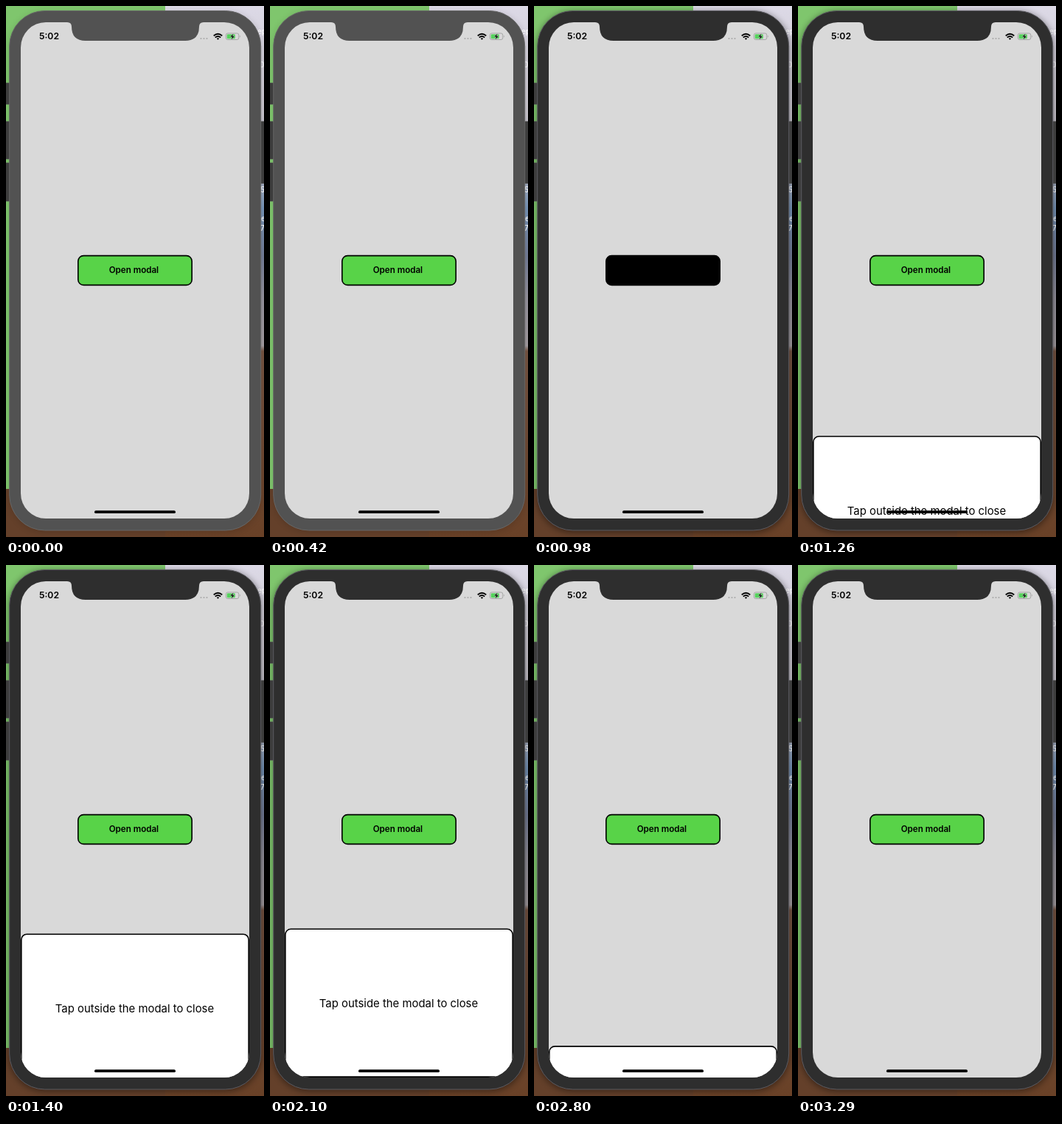
An HTML page that plays this animation: 350x718 px, repeating every 3.36 s.

```html
<!DOCTYPE html>
<html lang="en">
<head>
<meta charset="utf-8">
<title>Modal demo</title>
<style>
  html, body { margin: 0; width: 100%; height: 100%; overflow: hidden; }
  svg { display: block; width: 350px; height: 718px; font-family: Inter, Roboto, sans-serif; }
  #bezel, #notch { fill: #525252; }
  #bezel { stroke: #666; }
  .active #bezel, .active #notch { fill: #2e2e2e; }
  .active #bezel { stroke: #5b5a60; }
  #shadow { opacity: .12; }
  .active #shadow { opacity: .4; }
  .pressed rect { fill: #000; }
  .pressed text { visibility: hidden; }
</style>
</head>
<body>
<svg id="stage" viewBox="0 0 350 718">
  <defs>
    <linearGradient id="desk" x2="0" y2="1">
      <stop offset="0" stop-color="#dcd9e6"/>
      <stop offset=".2" stop-color="#c9c5cd"/>
      <stop offset=".33" stop-color="#a9b1c4"/>
      <stop offset=".38" stop-color="#7795b9"/>
      <stop offset=".47" stop-color="#747d98"/>
      <stop offset=".55" stop-color="#96939d"/>
      <stop offset=".64" stop-color="#a29ca0"/>
      <stop offset=".65" stop-color="#765442"/>
      <stop offset="1" stop-color="#694127"/>
    </linearGradient>
    <filter id="blur" x="-10%" y="-10%" width="120%" height="120%">
      <feGaussianBlur stdDeviation="4"/>
    </filter>
    <clipPath id="screen"><rect x="20" y="22" width="310" height="671" rx="34"/></clipPath>
  </defs>

  <!-- desktop -->
  <rect width="350" height="718" fill="url(#desk)"/>
  <rect width="216" height="653" fill="#7fc66d"/>
  <rect y="653" width="216" height="65" fill="#64402a"/>
  <g fill="#fff" font-size="10" font-weight="500">
    <text x="341" y="38">ep</text>
    <text x="344" y="83">0</text>
    <text x="345" y="252">5</text>
    <text x="346" y="291">e</text>
    <text x="345" y="304">7</text>
  </g>
  <rect id="shadow" x="4" y="7" width="343" height="705" rx="49" filter="url(#blur)"/>

  <!-- phone -->
  <g fill="#3d3d3d" stroke="#555" stroke-width=".6">
    <rect x="-4" y="104" width="10" height="29" rx="2"/>
    <rect x="-4" y="156" width="10" height="51" rx="2"/>
    <rect x="-4" y="212" width="10" height="52" rx="2"/>
    <rect x="344" y="156" width="10" height="84" rx="2"/>
  </g>
  <rect id="bezel" x="4.7" y="6.5" width="341" height="702.5" rx="48"/>

  <g clip-path="url(#screen)">
    <rect x="20" y="22" width="310" height="671" fill="#d9d9d9"/>
    <g id="button">
      <rect x="97.8" y="337.6" width="154.4" height="39.8" rx="7.5" fill="#58d348" stroke="#000" stroke-width="1.6"/>
      <text x="173.4" y="361" text-anchor="middle" font-size="11.6" font-weight="600">Open modal</text>
    </g>
    <g id="modal">
      <rect x="20.8" y="492.3" width="308.4" height="199.8" rx="7.5" fill="#fff" stroke="#000" stroke-width="1.6"/>
      <text x="174.5" y="598" text-anchor="middle" font-size="14.9">Tap outside the modal to close</text>
    </g>
    <rect x="120" y="682.3" width="110" height="3.8" rx="1.9"/>
  </g>
  <path id="notch" d="M83 21.5V22q6 0 6 6 0 19 19 19H243q19 0 19-19 0-6 6-6v-.5z"/>

  <!-- status bar -->
  <text x="45" y="45.3" font-size="12.2" font-weight="600">5:02</text>
  <path d="M264.5 44h12" stroke="#aaa" stroke-width="2.2" stroke-linecap="round" stroke-dasharray="0 4"/>
  <g fill="none" stroke="#000" stroke-width="1.9">
    <path d="M281.8 40.3q5.7-5.2 11.4 0M283.8 42.6q3.7-3.3 7.4 0"/>
    <path d="M285.8 43.9q1.7-1.4 3.4 0L287.5 45.8z" fill="#000" stroke="none"/>
  </g>
  <rect x="298.4" y="36.9" width="17.4" height="8.6" rx="2.4" fill="none" stroke="#999" stroke-width=".8"/>
  <rect x="299.7" y="38.2" width="11.2" height="6" rx="1.3" fill="#55d35c"/>
  <path d="M317 39.6q1.5 1.6 0 3.2z" fill="#999"/>
  <path d="M308.6 37l-4.6 4.8h2.7l-1.2 3.9 4.8-5h-2.8z" stroke="#d9d9d9" stroke-width=".4"/>
</svg>
<script>
  const LOOP = 3360, STEP = 70, TRAVEL = 671;
  const PRESS = 980, RELEASE = 1120, OPEN = 1100, CLOSE = 2758;
  const stage = document.getElementById('stage');
  const button = document.getElementById('button');
  const modal = document.getElementById('modal');

  // Critically damped spring, 0 to 1
  function spring(ms) {
    const x = Math.max(0, ms) * 0.022;
    return 1 - (1 + x) * Math.exp(-x);
  }

  function draw(now) {
    const t = Math.floor((now % LOOP) / STEP) * STEP;
    const hidden = t < CLOSE ? 1 - spring(t - OPEN) : spring(t - CLOSE);
    stage.classList.toggle('active', t >= PRESS);
    button.classList.toggle('pressed', t >= PRESS && t < RELEASE);
    modal.setAttribute('transform', `translate(0 ${(hidden * TRAVEL).toFixed(2)})`);
    requestAnimationFrame(draw);
  }

  const start = performance.now();
  requestAnimationFrame(now => draw(Math.max(0, now - start)));
</script>
</body>
</html>
```
